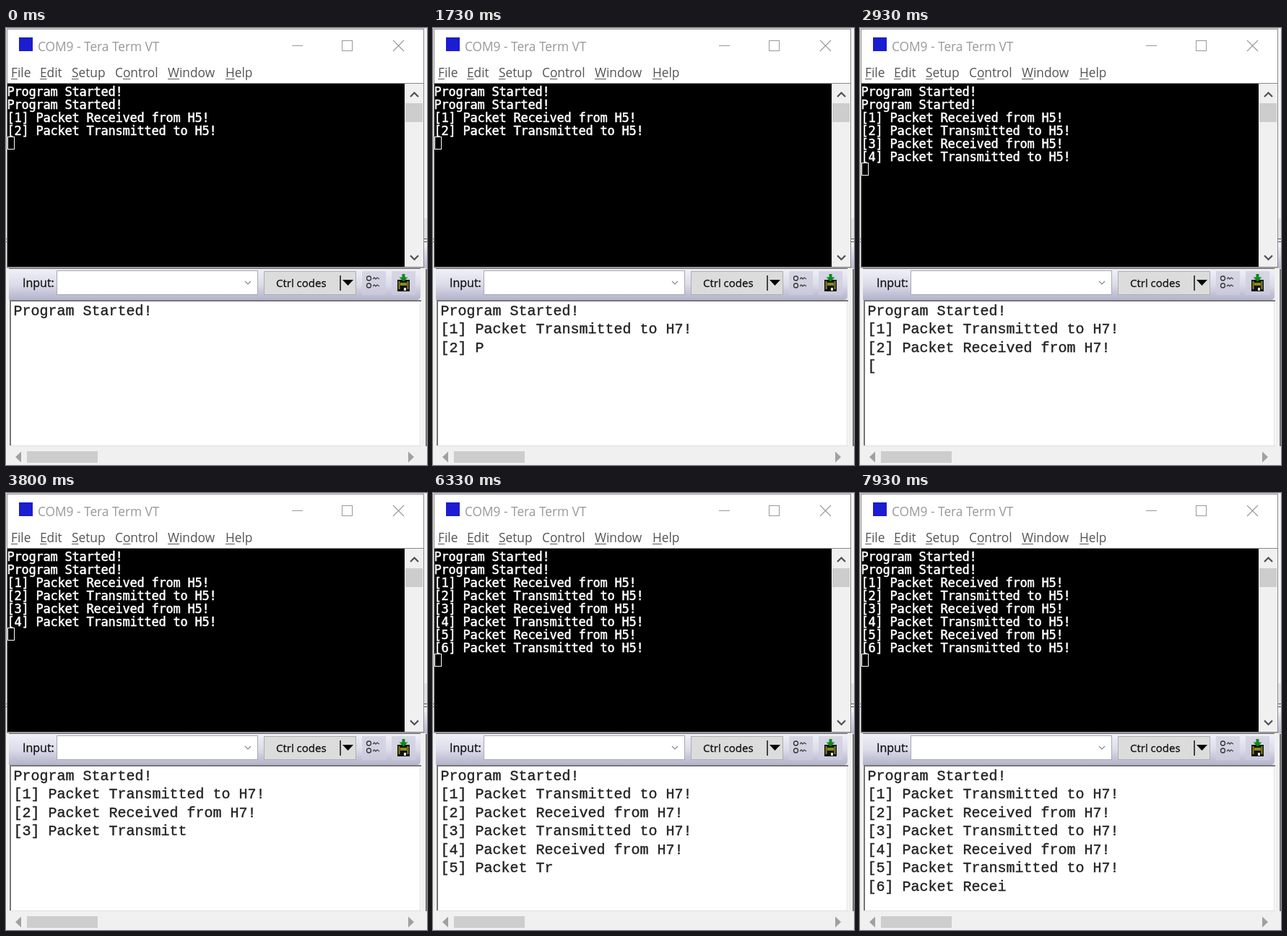
An HTML page with a canvas for the animation above (8000 ms loop, 583x604 px).

```html
<!DOCTYPE html>
<html lang="en">
<head>
<meta charset="utf-8">
<title>Packet exchange</title>
<style>
html, body { margin: 0; width: 100%; height: 100%; overflow: hidden; background: #f0f0f0; }
canvas { display: block; width: 583px; height: 604px; }
</style>
</head>
<body>
<canvas id="stage"></canvas>
<script>
const W = 583, H = 604;
const TICKS = 120, TICK = 8000 / TICKS;
const canvas = document.getElementById('stage');
const ctx = canvas.getContext('2d');
const dpr = window.devicePixelRatio || 1;
canvas.width = W * dpr;
canvas.height = H * dpr;
ctx.scale(dpr, dpr);

const UI = '"Open Sans", "Noto Sans", sans-serif';
const TERM = '17px "DejaVu Sans Mono", monospace';
const LOG = '20px "Liberation Mono", monospace';

function rect(x, y, w, h, fill) {
  ctx.fillStyle = fill;
  ctx.fillRect(x, y, w, h);
}

function frame(x, y, w, h, color) {
  ctx.strokeStyle = color;
  ctx.lineWidth = 1;
  ctx.strokeRect(x + 0.5, y + 0.5, w - 1, h - 1);
}

function line(points, color, width = 1) {
  ctx.strokeStyle = color;
  ctx.lineWidth = width;
  ctx.beginPath();
  points.forEach(([x, y]) => ctx.lineTo(x, y));
  ctx.stroke();
}

function shape(points, fill) {
  ctx.fillStyle = fill;
  ctx.beginPath();
  points.forEach(([x, y]) => ctx.lineTo(x, y));
  ctx.fill();
}

// A thin outline thickens the glyphs when weight is given
function text(str, x, y, font, color, weight = 0) {
  ctx.font = font;
  ctx.fillStyle = ctx.strokeStyle = color;
  ctx.lineWidth = weight;
  ctx.fillText(str, x, y);
  if (weight) ctx.strokeText(str, x, y);
}

// One glyph per cell of a fixed grid
function mono(str, x, y, pitch, font, color, weight) {
  [...str].forEach((ch, i) => text(ch, x + i * pitch, y, font, color, weight));
}

function menuItem(label, x, key) {
  const font = '17.3px ' + UI;
  text(label, x, 68, font, '#555');
  const start = x + ctx.measureText(label.slice(0, key)).width;
  rect(start, 70, ctx.measureText(label[key]).width, 1, '#555');
}

function backdrop() {
  rect(0, 0, W, H, '#f0f0f0');
  rect(0, 0, W, 1, '#d8dae0');
  rect(579, 1, 4, 262, '#f4f4f6');
  rect(579, 263, 4, 28, '#e2e2e6');
  for (const y of [291, 295]) {
    rect(0, y, 2, 1, '#555');
    rect(579, y, 4, 1, '#555');
  }
  const g = ctx.createLinearGradient(0, 303, 0, 332);
  g.addColorStop(0, '#e8e8f4');
  g.addColorStop(1, '#b8b8d0');
  rect(579, 303, 4, 29, g);
}

function terminal(rows) {
  rect(1, 1, 578, 330, '#fff');
  frame(1, 1, 578, 330, '#8a8a8a');

  rect(18, 13, 19, 19, '#1c1cd0');
  text('COM9 - Tera Term VT', 44, 32, '17.3px ' + UI, '#999');
  rect(396, 24, 15, 1, '#999');
  frame(465, 17, 15, 15, '#999');
  line([[536, 17], [551, 32]], '#999', 1.1);
  line([[551, 17], [536, 32]], '#999', 1.1);

  menuItem('File', 7, 0);
  menuItem('Edit', 47, 0);
  menuItem('Setup', 91, 0);
  menuItem('Control', 151, 1);
  menuItem('Window', 224, 0);
  menuItem('Help', 304, 0);

  rect(2, 76, 576, 1, '#888');
  rect(2, 77, 550, 253, '#000');
  rect(552, 77, 26, 253, '#f0f0f0');
  rect(553, 104, 24, 26, '#cdcdcd');
  line([[560, 95], [565.5, 89.5], [571, 95]], '#505050', 2.2);
  line([[560, 314.5], [565.5, 320], [571, 314.5]], '#505050', 2.2);

  rows.forEach((row, i) => mono(row, 1.5, 93.5 + 18 * i, 10, TERM, '#fff', 0.5));
  frame(2, 78 + 18 * rows.length, 10, 18, '#fff');
}

function listIcon() {
  for (const y of [346, 356]) {
    ctx.strokeStyle = '#333';
    ctx.lineWidth = 1.3;
    ctx.beginPath();
    ctx.arc(502.5, y, 3, 0, 7);
    ctx.stroke();
    line([[508, y + 1], [510, y - 1], [512, y + 1], [514, y - 1], [517, y + 1]], '#444', 1.3);
  }
}

function saveIcon() {
  rect(542, 348, 17, 16, '#111');
  rect(543.5, 350, 2, 11, '#8a8a20');
  rect(555.5, 350, 2, 11, '#8a8a20');
  rect(546, 352, 9, 4, '#8a8a20');
  rect(551, 359, 3, 4, '#e0e0e0');
  rect(548.5, 340, 4, 5, '#0a8a1a');
  shape([[544.5, 344.5], [556.5, 344.5], [550.5, 350.5]], '#0a8a1a');
}

function toolbar() {
  rect(1, 331, 578, 1, '#aaa');
  const g = ctx.createLinearGradient(0, 333, 0, 376);
  g.addColorStop(0, '#f0f0f8');
  g.addColorStop(0.5, '#dcdcea');
  g.addColorStop(1, '#b2b2ca');
  ctx.fillStyle = g;
  ctx.beginPath();
  ctx.roundRect(4, 333, 570, 43, [0, 0, 5, 0]);
  ctx.fill();
  rect(4, 332, 570, 1, '#666');

  text('Input:', 23, 358, '16px ' + UI, '#111', 0.3);
  rect(70, 335, 279, 34, '#fff');
  frame(70, 335, 279, 34, '#a8a8b0');
  line([[331, 350], [335, 354], [339, 350]], '#888', 1.2);

  rect(357, 336, 128, 33, '#dcdcdc');
  frame(357, 336, 128, 33, '#adadad');
  text('Ctrl codes', 374, 358, '15px ' + UI, '#111', 0.3);
  rect(462, 342, 2, 21, '#444');
  shape([[466, 348], [481, 348], [473.5, 356]], '#000');

  rect(493, 336, 33, 33, 'rgba(205,205,222,.7)');
  rect(534, 336, 33, 33, 'rgba(205,205,222,.7)');
  listIcon();
  saveIcon();
}

function logPane(rows) {
  rect(5, 376, 570, 202, '#fff');
  rect(5, 376, 570, 2, '#777');
  rect(5, 376, 2, 202, '#777');
  rect(573, 378, 1, 200, '#dedede');
  rect(5, 577, 570, 1, '#e0e0e0');
  rect(581, 333, 2, 245, '#777');

  rect(4, 578, 570, 26, '#f0f0f0');
  rect(29, 585, 98, 16, '#cdcdcd');
  shape([[13, 593], [21, 585.5], [21, 600.5]], '#a0a0a0');
  shape([[565, 593], [557, 585.5], [557, 600.5]], '#a0a0a0');

  rows.forEach((row, i) => mono(row, 10.5, 396.5 + 25.5 * i, 12, LOG, '#222', 0.4));
}

const sent = (n, peer) => `[${n}] Packet Transmitted to ${peer}!`;
const got = (n, peer) => `[${n}] Packet Received from ${peer}!`;

// Serial output: [time, characters received], line breaks count as two
const PACE = [[60, 0], [530, 10.4], [1730, 36.4], [3800, 81.05], [6330, 135.1], [8000, 171.3]];

function received(t) {
  if (t <= PACE[0][0]) return 0;
  const i = PACE.findIndex(p => t <= p[0]);
  const [t0, n0] = PACE[i - 1], [t1, n1] = PACE[i];
  return Math.floor(n0 + (n1 - n0) * (t - t0) / (t1 - t0));
}

function logRows(t) {
  const rows = ['Program Started!'];
  let left = received(t);
  for (let n = 1; left > 0; n++) {
    const row = n % 2 ? sent(n, 'H7') : got(n, 'H7');
    rows.push(row.slice(0, left));
    left -= row.length + 2;
  }
  return rows;
}

function termRows(t) {
  const rows = ['Program Started!', 'Program Started!'];
  [0, 2730, 5595].forEach((at, i) => {
    if (t >= at) rows.push(got(2 * i + 1, 'H5'), sent(2 * i + 2, 'H5'));
  });
  return rows;
}

function draw(now) {
  // The small lead absorbs rounding of times to whole milliseconds
  const t = Math.floor((now + 4) / TICK) % TICKS * TICK;
  backdrop();
  terminal(termRows(t));
  toolbar();
  logPane(logRows(t));
}

let start = null;
function loop(now) {
  if (start === null) start = now;
  draw(now - start);
  requestAnimationFrame(loop);
}
draw(0);
requestAnimationFrame(loop);
</script>
</body>
</html>
```
